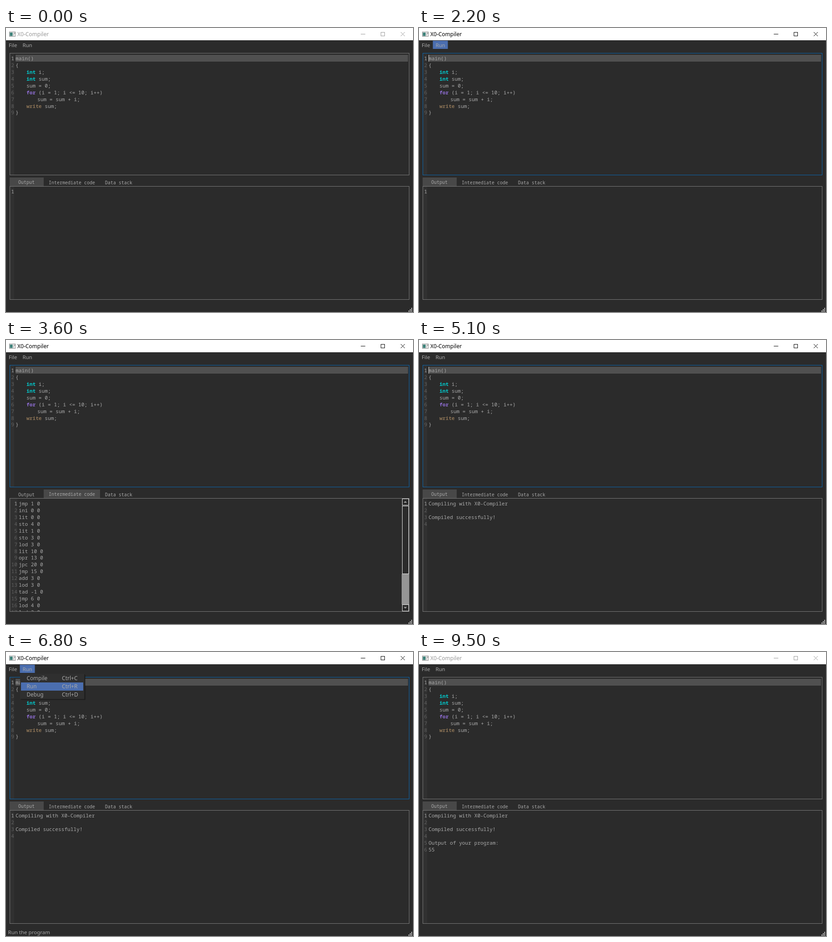
These frames come from a looping animation (896 by 625 pixels, 9600 ms). An HTML page:

```html
<!DOCTYPE html>
<html lang="en">
<head>
<meta charset="utf-8">
<title>X0-Compiler</title>
<style>
  html, body { margin: 0; width: 100%; height: 100%; overflow: hidden; background: #2b2b2b; }
  svg { display: block; }
  text { white-space: pre; fill: #a9a9a9; }
  .ui { font: 11.8px "Noto Sans", sans-serif; }
  .mono { font: 11.2px "Noto Sans Mono", monospace; }
  .tab { font: 10px "Noto Sans Mono", monospace; }
  .number { fill: #606060; text-anchor: end; }
  .current { fill: #a9a9a9; }
  .type { fill: #00ced1; font-weight: bold; }
  .loop { fill: #9370db; font-weight: bold; }
  .io { fill: #8b7355; font-weight: bold; }
</style>
</head>
<body>
<svg id="stage" width="896" height="625" viewBox="0 0 896 625"></svg>
<script>
const LOOP = 9600, PITCH = 14.93, BLUE = '#4b6eaf';

const source = [
  [0, 'main()'],
  [0, '{'],
  [1, 'int i;', 'type'],
  [1, 'int sum;', 'type'],
  [1, 'sum = 0;'],
  [1, 'for (i = 1; i <= 10; i++)', 'loop'],
  [2, 'sum = sum + i;'],
  [1, 'write sum;', 'io'],
  [0, '}'],
];

const instructions = ['jmp 1 0', 'ini 0 0', 'lit 0 0', 'sto 4 0', 'lit 1 0', 'sto 3 0',
  'lod 3 0', 'lit 10 0', 'opr 13 0', 'jpc 20 0', 'jmp 15 0', 'add 3 0', 'lod 3 0',
  'tad -1 0', 'jmp 6 0', 'lod 4 0', 'lod 3 0'];

const compiled = ['Compiling with X0-Compiler', '', 'Compiled successfully!', ''];
const finished = [...compiled, 'Output of your program:', '55'];

const tabs = [
  { label: 'Output', x: 8, width: 75, textX: 27 },
  { label: 'Intermediate code', x: 83, width: 124, textX: 94 },
  { label: 'Data stack', x: 207, width: 82, textX: 218 },
];

const menuItems = [['Compile', 'Ctrl+C'], ['Run', 'Ctrl+R'], ['Debug', 'Ctrl+D']];
const tips = ['Compile the program', 'Run the program'];

// Each entry changes part of the state from its time on.
const timeline = [
  [0, { active: false, caret: false, runLit: false, menu: 0, hover: -1, tab: 0, output: [''] }],
  [900, { runLit: true }],
  [1200, { active: true, caret: true }],
  [1300, { menu: 0.5, caret: false }],
  [1400, { menu: 1 }],
  [1800, { hover: 0 }],
  [2200, { menu: 0, hover: -1, caret: true }],
  [2300, { runLit: false, output: compiled }],
  [2600, { caret: false }],
  [3100, { caret: true }],
  [3600, { caret: false, tab: 1 }],
  [4100, { caret: true }],
  [4600, { caret: false }],
  [5100, { caret: true, tab: 0 }],
  [5500, { caret: false }],
  [5900, { runLit: true }],
  [6000, { caret: true }],
  [6200, { menu: 0.5, caret: false }],
  [6300, { menu: 1 }],
  [6700, { hover: 0 }],
  [6800, { hover: 1 }],
  [7500, { menu: 0, hover: -1, runLit: false, caret: true, output: finished }],
  [8000, { caret: false }],
  [8500, { caret: true }],
  [8900, { caret: false }],
  [9400, { caret: true }],
  [9500, { caret: false, active: false }],
];

const escapeText = s => s.replace(/&/g, '&amp;').replace(/</g, '&lt;');
const rect = (x, y, w, h, fill, extra = '') =>
  `<rect x="${x}" y="${y}" width="${w}" height="${h}" fill="${fill}" ${extra}/>`;
const frame = (x, y, w, h, stroke, fill = 'none') =>
  rect(x + 0.5, y + 0.5, w - 1, h - 1, fill, `stroke="${stroke}"`);
const path = (d, stroke, fill = 'none') => `<path d="${d}" stroke="${stroke}" fill="${fill}"/>`;
const label = (x, y, s, cls = 'ui', style = '') =>
  `<text x="${x}" y="${y}" class="${cls}" style="${style}">${escapeText(s)}</text>`;

const baseline = (top, row) => Math.round(top + row * PITCH);
const lineNumber = (x, y, row) =>
  label(x, y, String(row + 1), 'mono number' + (row ? '' : ' current'));

function titleBar(active) {
  const ink = active ? '#000' : '#999';
  return rect(0, 0, 896, 27, '#fff') +
    frame(7, 8, 14, 11, '#8c8c8c', '#f4f4f4') +
    rect(8.5, 10, 6, 7.5, '#3c8078') +
    rect(15.5, 10, 2, 7.5, '#c4c4c4') +
    rect(18.5, 10, 1.2, 3, '#777') +
    label(25, 18, 'X0-Compiler', 'ui', `font-size:12px;fill:${ink}`) +
    path('M781 13.5H791', ink) +
    frame(825, 9, 9, 9, ink) +
    path('M869 9L878 18M878 9L869 18', ink);
}

function menuBar(runLit) {
  return (runLit ? rect(30.5, 28, 33, 18, BLUE) : '') +
    label(6, 42, 'File', 'ui', 'font-size:11.6px') +
    label(36.5, 42, 'Run', 'ui', 'font-size:11.4px');
}

function sourceLine([indent, code, cls], row) {
  const y = baseline(71, row);
  const split = cls ? code.indexOf(' ') : 0;
  const keyword = cls ? `<tspan class="${cls}">${code.slice(0, split)}</tspan>` : '';
  return lineNumber(18, y, row) +
    `<text x="${21 + 24 * indent}" y="${y}" class="mono">${keyword}${escapeText(code.slice(split))}</text>`;
}

function editor({ active, caret }) {
  return rect(9, 56, 9, 267, '#313131') +
    rect(21, 59, 864, 15, '#505050') +
    source.map(sourceLine).join('') +
    (caret ? rect(21, 59, 1, 15, '#d4d4d4') : '') +
    frame(8, 55, 880, 269, active ? '#0b66ad' : '#7a7a7a');
}

function tabBar(selected) {
  return tabs.map(({ label: name, x, width, textX }, i) =>
    (i === selected ? rect(x, 329, width, 19, '#484848') : '') +
    label(textX, i === selected ? 343 : 344, name, 'tab')).join('');
}

function scrollBar() {
  return rect(871, 349, 16, 248, '#2b2b2b') +
    rect(871, 515, 16, 67, '#959595') +
    frame(872, 349, 15, 15, '#e8e8e8', '#2b2b2b') +
    frame(872, 365, 15, 150, '#e8e8e8', '#2b2b2b') +
    frame(872, 582, 15, 15, '#e8e8e8', '#2b2b2b') +
    path('M875.5 358L879 354.5L882.5 358Z', 'none', '#a9a9a9') +
    path('M875.5 587.5L879 591L882.5 587.5Z', 'none', '#a9a9a9');
}

function results({ tab, output }) {
  const lines = tab ? instructions : output;
  const shift = tab ? 7 : 0;
  const rows = lines.map((line, row) => {
    const y = baseline(364, row);
    return lineNumber(18 + shift, y, row) + label(21 + shift, y, line, 'mono');
  });
  return '<clipPath id="pane"><rect x="9" y="349" width="878" height="248"/></clipPath>' +
    `<g clip-path="url(#pane)">${rect(9, 349, 9 + shift, 248, '#313131')}${rows.join('')}</g>` +
    (tab ? scrollBar() : '') +
    frame(8, 348, 880, 250, '#7a7a7a');
}

function runMenu({ menu, hover }) {
  if (!menu) return '';
  const items = menuItems.map(([name, keys], i) => {
    const y = 49 + 18 * i;
    return (i === hover ? rect(33, y, 137, 18, BLUE) : '') +
      label(45.5, y + 13, name) + label(123, y + 13, keys, 'ui', 'font-size:12.1px');
  });
  return `<g opacity="${menu}">` +
    rect(34, 51, 141, 54.5, '#000', 'opacity=".3"') +
    rect(32, 49, 142, 55.5, '#1d1d1d') +
    rect(31, 48, 141.5, 55.5, '#2f2f2f') +
    items.join('') + '</g>';
}

function statusBar(hover) {
  let grip = '';
  for (let row = 0; row < 3; row++)
    for (let col = 0; col <= row; col++)
      grip += rect(892 - 3 * col, 616 + 3 * row, 2, 2, '#e0e0e0');
  return label(4.5, 621, tips[hover] || '', 'ui', 'font-size:11.5px') + grip;
}

const stage = document.getElementById('stage');
let shownStep = -1;

function draw(now) {
  const time = now % LOOP;
  const step = timeline.filter(([start]) => start <= time).length;
  if (step !== shownStep) {
    shownStep = step;
    const state = Object.assign({}, ...timeline.slice(0, step).map(([, change]) => change));
    stage.innerHTML = rect(0, 0, 896, 625, '#2b2b2b') +
      titleBar(state.active) + menuBar(state.runLit) + editor(state) +
      tabBar(state.tab) + results(state) + statusBar(state.hover) + runMenu(state);
  }
}

const begin = performance.now();
function tick() {
  draw(performance.now() - begin);
  requestAnimationFrame(tick);
}
tick();
</script>
</body>
</html>
```
